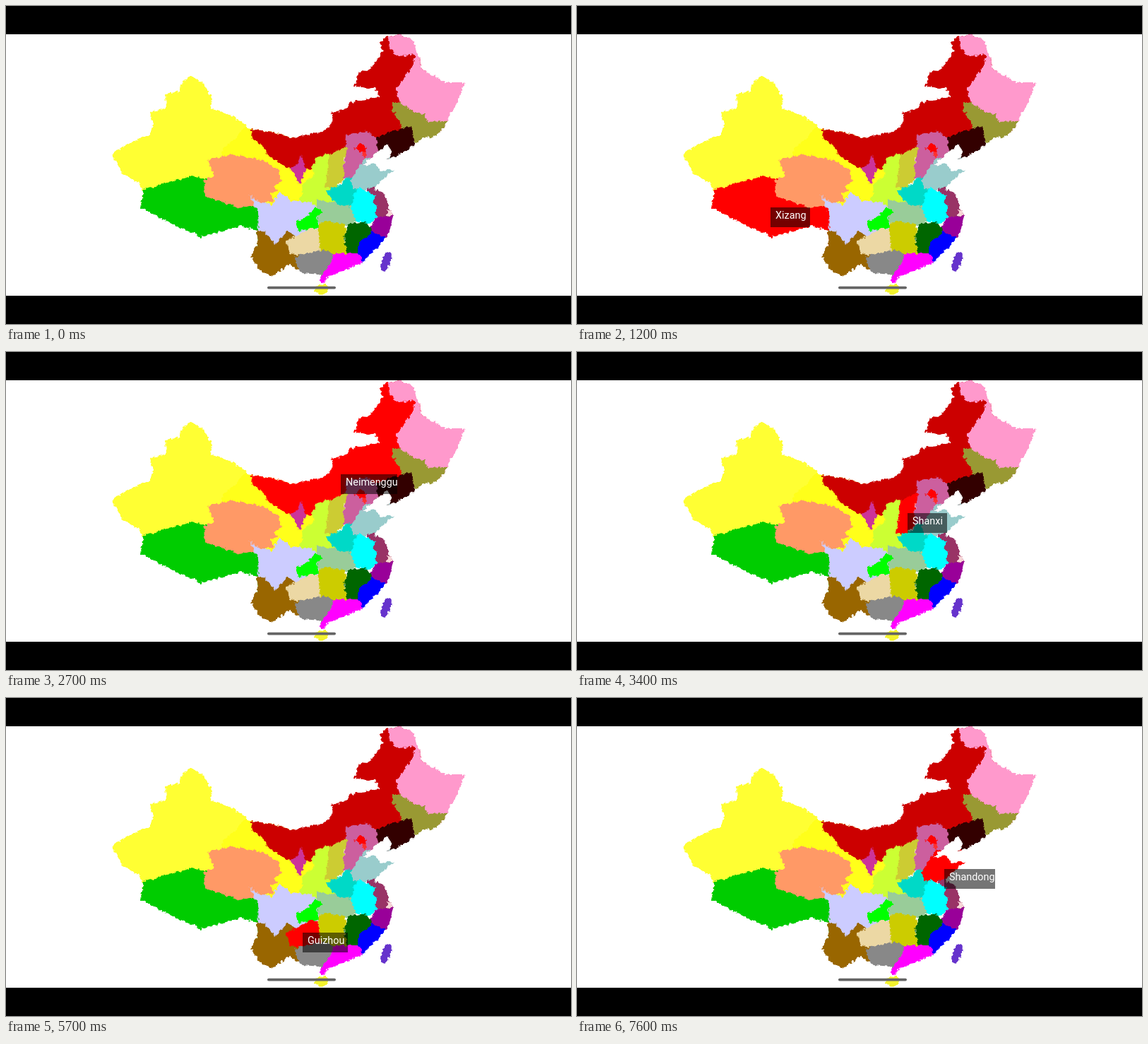
Animation of 800x450 px, one loop 8000 ms. Source, as an HTML page:

```html
<!DOCTYPE html>
<html lang="en">
<head>
<meta charset="utf-8">
<title>Province map</title>
<style>
  html, body { margin: 0; width: 100%; height: 100%; overflow: hidden; background: #000; }
  svg { display: block; width: 800px; height: 450px; }
  text { font: 14.4px Roboto, "Noto Sans", sans-serif; fill: #fff; }
</style>
</head>
<body>
<svg viewBox="0 0 800 450">
  <defs>
    <!-- gives every border a ragged edge -->
    <filter id="ragged" filterUnits="userSpaceOnUse" x="0" y="0" width="800" height="450" color-interpolation-filters="sRGB">
      <feTurbulence type="fractalNoise" baseFrequency=".2" numOctaves="2" seed="4" result="noise"/>
      <feDisplacementMap in="SourceGraphic" in2="noise" scale="7" xChannelSelector="R" yChannelSelector="G"/>
    </filter>
    <clipPath id="screen"><rect y="40" width="800" height="370"/></clipPath>
    <clipPath id="country">
      <polygon points="150,210 163,200 203,182 208,168 204,150 227,145 226,124 247,121 250,107 262,99 280,110 292,130 290,145 316,153 334,164 345,174 378,178 405,187 452,176 463,163 460,152 482,145 490,135 529,129 523,117 494,114 500,92 512,93 534,65 530,53 537,44 557,40 576,48 590,90 622,108 650,108 638,140 628,153 622,170 608,184 590,187 572,202 541,217 546,207 541,196 526,206 503,227 523,223 530,233 550,231 520,258 535,265 548,298 542,323 525,342 503,364 453,385 452,392 445,390 445,380 420,378 402,365 378,382 362,376 347,355 357,335 355,318 333,311 276,327 222,302 190,285 195,263 188,250 165,237"/>
    </clipPath>
  </defs>
  <rect y="40" width="800" height="370" fill="#fff"/>
  <g clip-path="url(#screen)">
    <g filter="url(#ragged)">
      <g id="map" clip-path="url(#country)"></g>
      <ellipse cx="447" cy="401" rx="10" ry="7.5" fill="#f3f32e"/>
      <ellipse cx="538.5" cy="361" rx="6" ry="15" transform="rotate(18 538.5 361)" fill="#6633cc"/>
    </g>
  </g>
  <rect x="370" y="396.7" width="97" height="3.8" rx="1.9" fill="#646464"/>
  <g id="label">
    <rect height="28" fill="#000" fill-opacity=".54"/>
    <text x="7" y="16"></text>
  </g>
</svg>
<script>
// Painted in order: each province overlaps the earlier ones,
// and the country's outline trims the outer sides.
const provinces = {
  Xinjiang: ["#ffff33", "100,90 350,90 344,174 320,300 100,270"],
  Xizang: ["#00cc00", "170,262 196,260 225,251 262,241 290,245 370,270 370,340 170,340"],
  Gansu: ["#ffff1a", "344,165 325,187 306,202 310,230 380,290 440,290 450,200"],
  Neimenggu: ["#cc0000", "345,165 349,187 365,200 370,210 397,228 436,232 470,215 530,200 570,170 600,100 560,30 490,40 480,120 400,160"],
  Heilongjiang: ["#ff99cc", "540,36 543,60 556,71 579,68 576,85 552,118 558,137 578,151 600,180 670,180 670,90 590,30"],
  Jilin: ["#999933", "548,136 558,136 578,151 592,153 597,164 640,162 610,200 578,192 560,170 548,148"],
  Liaoning: ["#330000", "522,188 540,179 574,170 579,195 545,225 522,215"],
  Hebei: ["#cc5f9e", "482,183 512,177 524,188 530,212 503,230 490,245 476,243 480,215"],
  Beijing: ["#ff0000", "493,202 501,194 510,201 508,208"],
  Tianjin: ["#ff3030", "504,206 511,207 507,218"],
  Shaanxi: ["#ccff33", "457,209 440,214 432,229 437,238 419,253 420,264 415,275 440,290 470,285 470,215"],
  Shanxi: ["#cccc33", "458,210 483,198 479,218 478,247 462,259 452,257"],
  Ningxia: ["#cc3399", "418,210 425,231 416,252 411,243 401,229 411,226"],
  Qinghai: ["#ff9966", "286,218 320,210 366,219 387,234 389,247 380,255 386,262 373,264 380,276 330,286 282,269 281,246 295,241"],
  Sichuan: ["#ccccff", "345,266 355,276 376,281 387,263 405,276 430,277 460,300 430,330 382,350 357,330 356,290"],
  Hubei: ["#99cc99", "440,275 488,280 498,292 497,304 485,311 440,306"],
  Chongqing: ["#00ff00", "438,284 449,291 439,299 444,314 414,319 410,306 425,298"],
  Henan: ["#00d9c7", "453,262 475,252 480,244 491,243 502,258 492,268 497,285 468,281"],
  Shandong: ["#99cccc", "488,247 508,215 570,215 540,262 492,259"],
  Jiangsu: ["#993366", "512,258 560,250 560,302 518,298"],
  Shanghai: ["#f8d8d8", "540,289 552,287 552,298 539,296"],
  Anhui: ["#00ffff", "492,267 500,257 524,268 520,278 526,284 521,292 526,299 515,309 495,304 489,285"],
  Zhejiang: ["#990099", "526,298 560,297 560,330 527,330 514,316"],
  Jiangxi: ["#006600", "483,309 508,305 519,318 498,354 481,350 479,325"],
  Fujian: ["#0000ff", "519,319 545,332 510,372 496,354 500,335"],
  Yunnan: ["#996600", "354,316 366,320 382,338 398,317 410,326 420,360 400,400 340,390 335,350"],
  Hunan: ["#cccc00", "443,307 458,304 481,309 479,330 482,350 460,354 441,345"],
  Guizhou: ["#ecd8a4", "397,332 413,325 432,313 442,317 445,347 425,356 403,350"],
  Guangxi: ["#888888", "409,355 450,344 463,350 461,363 446,384 418,390"],
  Guangdong: ["#ff00ff", "463,350 500,350 506,366 470,400 440,400 447,380 460,364"]
};

// Start time, selected province, touch point
const taps = [
  [0],
  [500, "Xinjiang", 242, 190],
  [1200, "Xizang", 274, 285],
  [1900, "Qinghai", 335, 250],
  [2400],
  [2700, "Neimenggu", 474, 173],
  [3400, "Shanxi", 468, 228],
  [4200, "Shaanxi", 440, 250],
  [4700, "Sichuan", 390, 301],
  [5300, "Yunnan", 374, 347],
  [5700, "Guizhou", 420, 332],
  [6400, "Guangxi", 437, 361],
  [6600],
  [6700, "Guangdong", 481, 360],
  [7100, "Jiangxi", 496, 322],
  [7600, "Shandong", 520, 242]
];
const LOOP = 8000;

const map = document.getElementById("map");
const label = document.getElementById("label");
const [box, text] = label.children;
const shapes = {};

for (const [name, [color, points]] of Object.entries(provinces)) {
  const shape = document.createElementNS(map.namespaceURI, "polygon");
  shape.setAttribute("points", points);
  shape.setAttribute("fill", color);
  map.append(shape);
  shapes[name] = shape;
}

let current = [];

function select(tap) {
  if (tap === current) return;
  const old = current[1];
  if (old) shapes[old].setAttribute("fill", provinces[old][0]);
  current = tap;
  const [, name, x, y] = tap;
  label.setAttribute("visibility", name ? "visible" : "hidden");
  if (!name) return;
  shapes[name].setAttribute("fill", "#ff0000");
  text.textContent = name;
  box.setAttribute("width", name.length * 8 + 8);
  label.setAttribute("transform", `translate(${x} ${y})`);
}

const start = performance.now();

function tick() {
  const time = (performance.now() - start) % LOOP;
  select(taps.findLast(tap => tap[0] <= time));
  requestAnimationFrame(tick);
}
tick();
</script>
</body>
</html>
```
